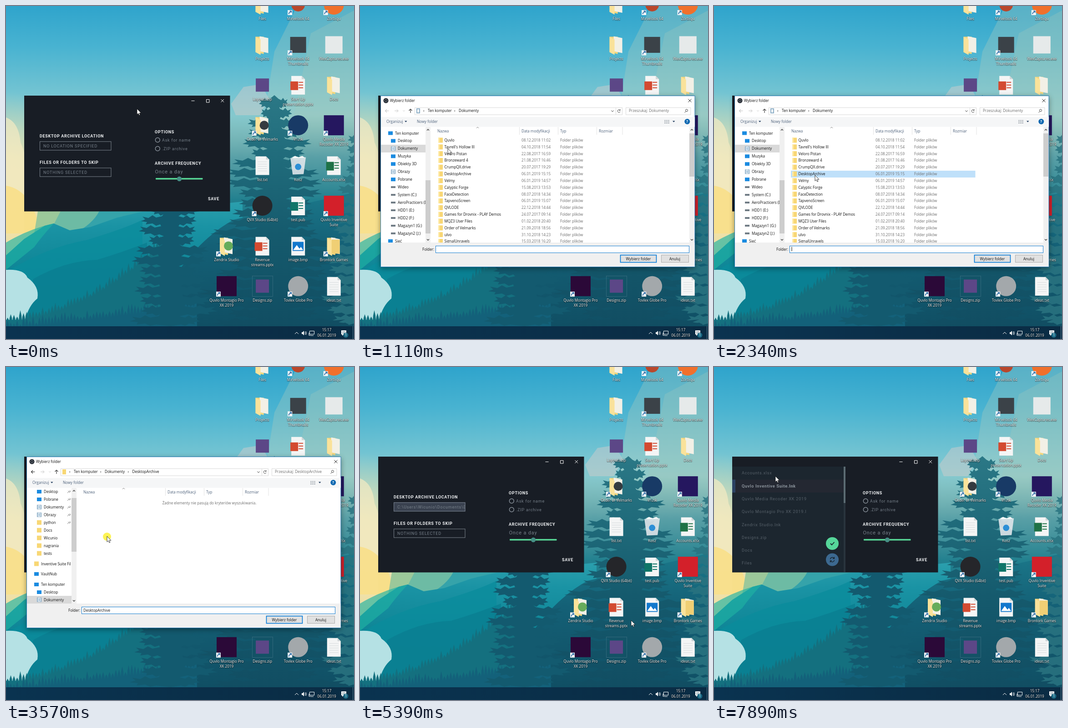
Recreate the animation shown at these times as an HTML page. Size 765 by 732 pixels, loop 7990 ms.

```html
<!DOCTYPE html>
<html lang="pl">
<head>
<meta charset="utf-8">
<title>Desktop archive</title>
<style>
html, body { margin: 0; width: 100%; height: 100%; overflow: hidden; background: #0a3048; }
svg { display: block; width: 100%; height: 100%; }
text { font: 8.1px "Open Sans", "Noto Sans", sans-serif; fill: #111; }
.label { fill: #fff; font-weight: 500; text-anchor: middle; text-shadow: 0 1px 1px #000c, 0 0 2px #0009; }
.mid { text-anchor: middle; }
.soft { fill: #6d6d6d; }
.head { fill: #4c607a; }
.app text { font: 9px Roboto, "Open Sans", sans-serif; letter-spacing: .8px; fill: #77808a; }
.app .title { font-weight: 700; letter-spacing: .68px; fill: #f1f3f5; }
.app .big { font-size: 11px; }
.app .dim { fill: #57616a; }
.app .lit { fill: #8f969e; font-weight: 500; }
#dialog { transform-origin: 390.5px 385px; }
</style>
</head>
<body>
<svg id="stage" viewBox="0 0 765 732" preserveAspectRatio="none"></svg>
<script>
const LOOP = 7990;
let css = '';

// Small drawing helpers
const rect = (x, y, w, h, fill, more = '') => `<rect x="${x}" y="${y}" width="${w}" height="${h}" fill="${fill}" ${more}/>`;
const circle = (x, y, r, fill, more = '') => `<circle cx="${x}" cy="${y}" r="${r}" fill="${fill}" ${more}/>`;
const path = (d, fill, more = '') => `<path d="${d}" fill="${fill}" ${more}/>`;
const line = (d, color, width = 1) => path(d, 'none', `stroke="${color}" stroke-width="${width}"`);
const text = (x, y, s, cls = '', more = '') => `<text x="${x}" y="${y}" class="${cls}" ${more}>${s}</text>`;
const group = (id, body, more = '') => `<g id="${id}" ${more}>${body}</g>`;
const box = (x, y, w, h, fill, color, width = 1) => rect(x, y, w, h, fill, `stroke="${color}" stroke-width="${width}"`);
const stops = list => list.map(([at, color]) => `<stop offset="${at}" stop-color="${color}"/>`).join('');
const gradient = (id, dir, ...list) => `<linearGradient id="${id}" x1="0" y1="0" ${dir}>${stops(list)}</linearGradient>`;
const clip = (id, x, y, w, h) => `<clipPath id="${id}">${rect(x, y, w, h, '#000')}</clipPath>`;

let seed = 11;
const random = () => (seed = seed * 16807 % 2147483647) / 2147483647;

// Keyframes keyed by milliseconds
function animate(id, frames, timing = 'linear') {
  const body = Object.entries(frames).map(([ms, rule]) => `${(ms / LOOP * 100).toFixed(3)}%{${rule}}`).join('');
  css += `@keyframes ${id}{${body}}#${id}{animation:${id} ${LOOP}ms ${timing} infinite}`;
}
// Toggles visibility at each given time
function blink(id, times, first = 0) {
  const frames = { 0: `opacity:${first}` };
  times.forEach((ms, i) => frames[ms] = `opacity:${(i + 1 + first) % 2}`);
  animate(id, frames, 'step-end');
}

// Wallpaper: a fir is a solid core with ragged, uneven branches
function fir(cx, top, bottom, spread, fill, opacity = 1) {
  const step = 22, count = Math.round((bottom - top) / step);
  const side = dir => Array.from({ length: count }, (_, i) => {
    const y = top + i * step, w = spread * Math.sqrt((i + 1) / count) * (.6 + .5 * random());
    return [[.3, 0], [.5, 3], [.62, -2], [.75, 4], [.95, 1], [.86, 7], [1, 11], [.8, 13], [.84, 18], [.62, 16], [.5, 21], [.36, 18]]
      .map(([k, dy]) => [cx + dir * w * k, y + dy]);
  }).flat();
  const points = [[cx, top - 8], ...side(1), [cx, bottom], ...side(-1).reverse()];
  return path('M' + points.map(p => p.map(Math.round).join(' ')).join('L') + 'Z', fill, `opacity="${opacity}"`);
}
function forest(x0, x1, ridge, fill) {
  let d = `M${x0} 704`;
  for (let x = x0; x < x1; x += 7) {
    const y = ridge(x), h = 9 + random() * 16;
    d += `L${x} ${y}L${x + 1} ${y - h * .5}L${x + 3.5} ${y - h}L${x + 6} ${y - h * .5}`;
  }
  return path(d + `L${x1} 704Z`, fill);
}
const wallpaper =
  rect(0, 0, 765, 704, 'url(#sky)') +
  path('M590 100L640 0H765V420H540Z', '#b5cdba', 'opacity=".3"') +
  path('M670 60L765 10V400H600Z', '#9fc5bb', 'opacity=".3"') +
  path('M495 215L522 178L560 172L578 203L558 240H505Z', '#d6cccb', 'opacity=".45"') +
  circle(0, 400, 210, 'url(#glow)') +
  path('M0 245Q28 255 32 300Q46 330 40 350V500H0Z', '#f6ecc4', 'opacity=".7"') +
  path('M0 395Q60 405 75 500H0Z', '#fbdf83', 'opacity=".8"') +
  path('M70 451H330V500H62Z', '#9bc89a') +
  path('M120 451H340V500H95Q105 480 120 451Z', '#6dbba4') +
  path('M205 451H330V500H150Q190 480 205 451Z', '#35a3aa') +
  rect(330, 240, 435, 464, 'url(#mist)') +
  path('M0 548L40 512L85 483L105 478L140 493L185 486L245 465L300 452L420 440L520 430V704H0Z', 'url(#hills)') +
  path('M0 520Q50 490 105 478Q80 505 62 530L0 580Z', '#1fb3a3', 'opacity=".65"') +
  path('M0 585Q90 530 175 515Q260 490 300 470V704H0Z', '#0a8c9d', 'opacity=".8"') +
  path('M60 600Q130 560 200 558Q260 540 310 520V704H30Z', '#0b7f92', 'opacity=".8"') +
  path('M310 704Q390 530 500 470L765 410V704Z', 'url(#ground)') +
  path('M0 580Q40 578 47 597Q74 616 69 643Q50 658 42 690H0Z', '#b5e1e4') +
  forest(0, 340, x => 694 - x * x * .0013 - x * .05, '#14707f') +
  forest(0, 420, x => 712 - x * .12, '#13617a') +
  fir(790, 240, 704, 110, '#2a7481', .85) +
  fir(590, 204, 704, 165, 'url(#bark)') +
  fir(362, 330, 704, 104, '#135a6f');

// Desktop icons
const paper = (x, y) => path(`M${x - 15} ${y - 20}H${x + 8}L${x + 15} ${y - 13}V${y + 21}H${x - 15}Z`, '#f4f5f5') +
  path(`M${x + 8} ${y - 20}V${y - 13}H${x + 15}Z`, '#cfd4d6');
const art = {
  folder: (x, y) => path(`M${x - 15} ${y - 18}H${x + 3}V${y + 20}L${x - 15} ${y + 16}Z`, '#f3d67e') +
    path(`M${x - 6} ${y - 19}L${x + 13} ${y - 15}V${y + 18}L${x - 6} ${y + 14}Z`, '#f2f0e6') +
    path(`M${x - 15} ${y - 18}L${x - 4} ${y - 12}V${y + 22}L${x - 15} ${y + 16}Z`, '#fae29a'),
  full: (x, y, color) => art.folder(x, y) + (color ? circle(x + 4, y, 10, color) : rect(x - 5, y - 14, 18, 31, '#f0cf74')),
  page: (x, y) => paper(x, y) + line([-8, -3, 2, 7, 12].map(dy => `M${x - 10} ${y + dy}h20`).join(''), '#d5dadc'),
  office: (x, y, color) => paper(x, y) + line(`M${x + 1} ${y - 6}h10M${x + 1} ${y}h10M${x + 1} ${y + 6}h10`, color, 2) + rect(x - 17, y - 8, 17, 19, color),
  picture: (x, y) => paper(x, y) + rect(x - 12, y - 9, 24, 20, '#1278cd') + path(`M${x - 11} ${y + 9}l8 -11l6 8l3 -4l5 7Z`, '#fff'),
  square: (x, y, color, size) => rect(x - size / 2, y - size / 2, size, size, color),
  disc: (x, y, color, r) => circle(x, y, r, color),
  bin: (x, y) => path(`M${x - 17} ${y - 16}L${x + 17} ${y - 18}L${x + 12} ${y + 19}L${x - 12} ${y + 20}Z`, '#dfe6ea', 'opacity=".9"') +
    path(`M${x - 15} ${y - 16}l8 -5l8 3l8 -3l6 4Z`, '#f8fafa') + circle(x, y + 3, 7, '#2c8fd6')
};
const desktop = [
  [1, 0, 'folder', 'Files'], [2, 0, 'disc', 'Mirvelook 64', '#b9472c', 15, 1], [3, 0, 'disc', 'Zorbiqu', '#f0702c', 22, 1],
  [1, 1, 'folder', 'Projects'], [2, 1, 'square', 'Mirvelook 64|Thumbnails', '#3b4248', 35, 1], [3, 1, 'square', 'WexCaptures.exe', '#e6eaea', 38],
  [1, 2, 'square', 'Layouts.zip', '#5c4787', 29], [2, 2, 'office', 'Start Up|presentation.pptx', '#d34a30'], [3, 2, 'folder', 'Docs'],
  [1, 3, 'full', 'Order of Velmarks', '#343b40', 0, 1], [2, 3, 'disc', 'Vrusk', '#183a66', 22, 1], [3, 3, 'square', 'Quvlo Media|Recoder XK 2019', '#25175f', 44, 1],
  [1, 4, 'page', 'list.txt'], [2, 4, 'bin', 'Kosz'], [3, 4, 'office', 'Accounts.xlsx', '#1f7246'],
  [1, 5, 'disc', 'QVX Studio (64bit)', '#25262a', 22, 1], [2, 5, 'office', 'test.pub', '#0f7568'], [3, 5, 'square', 'Quvlo Inventive|Suite', '#d3202a', 44, 1],
  [0, 6, 'full', 'Zendrix Studio', '#67ac5b', 0, 1], [1, 6, 'office', 'Revenue|streams.pptx', '#d34a30'], [2, 6, 'picture', 'image.bmp'], [3, 6, 'full', 'Brontork Games', '', 0, 1],
  [0, 7, 'square', 'Quvlo Montagio Pro|XK 2019', '#2b0938', 44, 1], [1, 7, 'square', 'Designs.zip', '#5c4787', 29], [2, 7, 'disc', 'Tovlex Globe Pro', '#a3a8ab', 22, 1], [3, 7, 'page', 'ideas.txt']
].map(([col, row, kind, name, color, size, link]) => {
  const x = 485 + col * 78.6, y = -3 + row * 88.4;
  return art[kind](x, y, color, size) +
    (link ? rect(x - 23, y + 12, 10, 11, '#f3f6f8') + line(`M${x - 20.5} ${y + 21}q0 -5 5 -5m-3 -2h3.5v3.5`, '#1c5f9e', 1.5) : '') +
    name.split('|').map((part, i) => text(x, y + 34 + i * 10.7, part, 'label')).join('');
}).join('') + box(541.5, 593.5, 45, 45, 'none', '#3f7385', .7);

// Taskbar
const taskbar = rect(0, 704, 765, 28, 'url(#bar)') +
  line('M635 721l4 -4l4 4M667.500 714.500h10v7h-10ZM670 724.500h6M666 718v6h4', '#fff') +
  path('M650 717h2l3 -3v10l-3 -3h-2Z', '#fff') + line('M657 716q2 3 0 6M659 715q3 4 0 8', '#fff') +
  text(705, 715, '15:17', 'label') + text(705, 727, '06.01.2019', 'label') +
  path('M737 713h11v9h-6l-3 3v-3h-2Z', '#fff') + line('M739 716h7M739 719h7', '#123a55', .8) +
  circle(747, 723.5, 5.5, '#1c6b86') + text(747, 726.3, '1', 'mid', 'style="fill:#fff"') + line('M762.500 704V732', '#4b7187');

// Settings window
const field = (y, id) => box(74.500, y, 156.500, 19, 'none', '#7d858e') + group(id, rect(74, y - .5, 157.500, 20, '#7f8ca6'));
const files = ['Accounts.xlsx', 'Quvlo Inventive Suite.lnk', 'Quvlo Media Recoder XK 2019', 'Quvlo Montagio Pro XK 2019.lnk', 'Zendrix Studio.lnk', 'Designs.zip', 'Docs', 'Files'];
const rowY = i => 236.3 + i * 28.3;
const panel = rect(40, 219, 249, 232, '#1c262f') + rect(285, 219, 4, 232, '#29343d') + rect(285, 219, 4, 80, '#5b6b72') +
  group('hover-file', rect(40, 247.5, 245, 28.5, '#242832') + rect(40, 247.5, 7, 28.5, '#2b4263')) +
  `<g clip-path="url(#names)">${files.map((f, i) => text(61, rowY(i), f, 'dim')).join('')}</g>` +
  group('lit-file', text(61, rowY(1), files[1], 'lit')) +
  circle(260, 388, 14, '#56d69a') + line('M256 388l3 3l5.500 -6', '#17222a', 1.8) +
  circle(260, 423.5, 14, '#3c6990') + line('M255.500 422.500a4.700 4.700 0 0 1 8.500 -2M264.500 424.500a4.700 4.700 0 0 1 -8.500 2M264.500 417.500v3.500h-3.500M255.500 429.500v-3.500h3.500', '#17222a', 1.3);
const app = `<g class="app">` + rect(40, 197, 452.5, 254.5, '#181d25') +
  line('M407.500 208.500h7M440.500 205.500h6.500v6.500h-6.500ZM472.500 205l6.500 6.500M479 205l-6.500 6.500', '#fff') +
  text(74, 289, 'DESKTOP ARCHIVE LOCATION', 'title') + field(298, 'hover-place') +
  group('no-place', text(82, 311, 'NO LOCATION SPECIFIED')) +
  group('place', text(82, 311, 'C:\\Users\\Wicunio\\Documents\\DesktopArchive', '', 'clip-path="url(#entry)"')) +
  text(74, 347, 'FILES OR FOLDERS TO SKIP', 'title') + field(356, 'hover-skip') + text(82, 369, 'NOTHING SELECTED') +
  text(327, 279.500, 'OPTIONS', 'title') +
  ['Ask for name', '.ZIP archive'].map((s, i) => circle(333.3, 294.5 + i * 19, 5, 'none', 'stroke="#89919a" stroke-width="1.4"') + text(343, 297.5 + i * 19, s)).join('') +
  text(327, 348.500, 'ARCHIVE FREQUENCY', 'title') + text(327.500, 368, 'Once a day', 'big') +
  rect(329, 378, 103.5, 3.5, '#55d192', 'rx="1"') + circle(381, 380, 5.2, '#468f86') +
  text(444, 427, 'SAVE', 'title') + group('panel', panel) + '</g>';

// Folder picker
const colors = { yellow: '#f8d775', blue: '#1a8be0', grey: '#6f7b84', doc: '#8fb0c8' };
function tree(rows) {
  return rows.map(([y, label, color = 'yellow', root = 0, picked = 0]) => {
    const x = root ? 62 : 68, flat = color === 'grey' ? 3 : color === 'blue' ? 1 : 0;
    return (picked ? rect(46, y - 8.5, 98, 17, '#d9d9d9') : '') +
      rect(x, y - 5 + flat, 10, 10 - 2 * flat, colors[color]) +
      (color === 'doc' ? rect(x + 2, y - 4, 6, 8, '#fff') + line(`M${x + 3} ${y - 2}h4M${x + 3} ${y}h4M${x + 3} ${y + 2}h4`, '#3b7cae', .8) : '') +
      text(root ? 77 : 83, y + 3, label);
  }).join('');
}
const spaced = (top, rows) => rows.map((row, i) => [top + i * 16.95, ...row]);
const thisPc = spaced(279.5, [['Ten komputer', 'blue', 1], ['Desktop', 'blue'], ['Dokumenty', 'doc', 0, 1], ['Muzyka', 'blue'], ['Obiekty 3D', 'blue'],
  ['Obrazy', 'doc'], ['Pobrane', 'blue'], ['Wideo', 'grey'], ['System (C:)', 'grey'], ['AeroPracticers (D:)', 'grey'], ['HDD1 (E:)', 'grey'],
  ['HDD2 (F:)', 'grey'], ['Magazyn1 (G:)', 'grey'], ['Magazyn2 (J:)', 'grey'], ['Sieć', 'blue', 1]]);
const quick = [...spaced(274, [['Desktop', 'blue'], ['Pobrane', 'blue'], ['Dokumenty', 'doc'], ['Obrazy', 'doc'], ['python'], ['Docs'], ['Wicunio'], ['nagrania'], ['tests']]),
  [432.5, 'Inventive Suite Fil', 'yellow', 1], [455, 'VaultNub', 'blue', 1], [478, 'Ten komputer', 'blue', 1], [495, 'Desktop', 'blue'], [511.5, 'Dokumenty', 'doc', 0, 1]];
const folders = `Quvlo|08.12.2018 11:02
Tavrell's Hollow III|04.10.2018 11:54
Veloro Pistan|22.08.2017 16:59
Bronzeward 4|21.08.2017 16:46
CrumpQX.drive|20.07.2017 19:29
DesktopArchive|06.01.2019 15:15
Velmy|06.01.2019 14:57
Calyptic Forge|15.08.2013 13:53
FaceDetection|08.07.2018 14:34
TapvenoScreen|06.01.2019 15:07
QVLODE|22.12.2018 14:44
Games for Drovnix - PLAY Demos|24.07.2017 09:14
MQZ3 User Files|01.02.2018 20:40
Order of Velmarks|21.09.2018 18:56
ulvo|31.10.2018 14:23
SignalUnravels|15.03.2018 16:20`.split('\n').map((row, i) => {
  const [name, date] = row.split('|'), y = 298 + i * 14.83;
  return rect(172, y - 8.500, 10, 11, '#f8d775') + rect(172, y - 8.500, 3, 11, '#ffe9a5') + text(185.500, y, name) + text(355, y, date, 'soft') + text(440, y, 'Folder plików', 'soft');
}).join('');
const crumbs = (...parts) => parts.map(([x, s]) => text(x - 10, 233, '›') + text(x, 233, s)).join('');
const arrows = x => line(`M${x - 2.500} 273.500l2.500 -2.500l2.500 2.500M${x - 2.500} 512.500l2.500 2.500l2.500 -2.500`, '#444', 1.3);
const side = (rows, thumb, height) => `<g clip-path="url(#tree)">${tree(rows)}</g>` + rect(144, 266, 11, 254, '#f0f0f0') + rect(144, thumb, 11, height, '#cdcdcd') + arrows(149.5);
const back = color => line('M55.500 230.500h8M59 227l-3.500 3.500l3.500 3.500', color, 1.1);

const listView = side(thisPc, 383, 117) +
  rect(724, 266, 11, 254, '#f0f0f0') + rect(724, 280, 11, 95, '#cdcdcd') + arrows(729.5) +
  group('hover-row', rect(169, 302.500, 405.500, 15, '#d5eafb')) +
  group('picked-row', rect(169, 362, 405.500, 15, '#bfe0fa')) +
  `<g clip-path="url(#rows)">${folders}</g>` + back('#c8c8c8') +
  rect(124, 225, 8, 11, '#8fb0c8') + rect(126, 227, 4, 7, '#fff') + text(591, 233, 'Przeszukaj: Dokumenty', 'soft');
const emptyView = side(quick, 288, 118) +
  line([0, 1, 2, 3, 4].map(i => `M135 ${277 + i * 17}l3 -3m-1.500 -2l4 4m-1 -5l2.500 2.500l-3 1`).join(''), '#777', .9) + back('#333') +
  text(447, 302, 'Żadne elementy nie pasują do kryteriów wyszukiwania.', 'soft mid') +
  rect(124, 225, 8, 11, '#f8d775') + crumbs([277.500, 'DesktopArchive']) + text(591, 233, 'Przeszukaj: DesktopArchive', 'soft');

const content =
  line('M76 230.500h8M80.500 227l3.500 3.500l-3.500 3.500M94.500 229.500l2 2l2 -2', '#c8c8c8') + line('M111 235v-8.500M107.500 230l3.500 -3.500l3.500 3.500', '#444', 1.2) +
  box(120.5, 223.5, 456, 15.5, 'none', '#d9d9d9') + box(584.5, 223.5, 142.5, 15.5, 'none', '#d9d9d9') +
  line('M562.500 224v15', '#d9d9d9') + line('M552.500 229.500l2.500 3l2.500 -3M571.500 229a3 3 0 1 0 .5 3M572 227v2.500h-2.500M713.500 234.500l3 -3', '#444') +
  circle(718, 229.500, 2.500, 'none', 'stroke="#444"') + crumbs([149, 'Ten komputer'], [217, 'Dokumenty']) +
  rect(46, 244, 690, 21.500, '#f5f6f7') + text(58, 257, 'Organizuj', 'head') + path('M98 252.500h5.500l-2.700 3Z', '#1e395b') +
  text(125, 257, 'Nowy folder', 'head') + line('M669 251.500h3m1 0h3m1 0h3M669 254.500h3m1 0h3m1 0h3M669 257.500h3m1 0h3m1 0h3', '#7b858f') +
  path('M687 252.500h5.500l-2.700 3Z', '#1e395b') + circle(719.3, 254, 6, '#0d68b1') + text(719.3, 257, '?', 'mid', 'style="fill:#fff;font-weight:700"') +
  line('M350.500 266v17M435.500 266v17M520.500 266v17M577 266v17', '#e3e3e3') + line('M256 268.500l2.500 -2.500l2.500 2.500', '#777') +
  [[170, 'Nazwa'], [355, 'Data modyfikacji'], [440, 'Typ'], [525, 'Rozmiar']].map(([x, s]) => text(x, 277.500, s, 'head')).join('') +
  group('list-view', listView) + group('empty-view', emptyView) +
  text(137, 538, 'Folder:') + group('caret', line('M171 529.500v9.500', '#000')) + group('chosen', text(170, 537.500, 'DesktopArchive')) +
  box(572.5, 547.5, 79, 16, '#e1e1e1', '#0078d7', 1.6) + box(662.5, 547.5, 60, 16, '#e1e1e1', '#adadad') +
  text(612, 558.500, 'Wybierz folder', 'mid') + text(692, 558.500, 'Anuluj', 'mid');
const dialog = rect(45.5, 197.5, 690.5, 376, '#fff', 'stroke="#2c7dbb" style="filter:drop-shadow(0 3px 6px #0006)"') +
  rect(46, 520, 689.5, 53, '#f0f0f0') +
  circle(57, 208, 5.500, '#20252d') + circle(57, 208, 2.800, 'none', 'stroke="#9aa4ad" stroke-width=".8"') +
  text(66, 211, 'Wybierz folder') + line('M721.500 204.500l7 7M728.500 204.500l-7 7', '#222') + arrows(149.5) +
  box(166.5, 527.5, 557, 15, '#fff', '#1a7fd0') + group('content', content);

const pointer = group('cursor', group('click', circle(0, 1, 9, '#fdf02c', 'opacity=".8"')) +
  path('M0 0V12.500L2.900 9.900L4.900 14.300L6.900 13.400L5 9.200H8.900Z', '#fff', 'stroke="#111" stroke-width=".8"'));

const defs = '<defs>' +
  gradient('sky', 'x2="0" y2="1"', [0, '#2fa4cc'], [.13, '#49b3d1'], [.28, '#76c5d2'], [.42, '#98cdc8'], [.55, '#b9d3bd'], [.7, '#e6d9a0']) +
  `<radialGradient id="glow">${stops([[.3, '#f5e6aecc'], [1, '#f5e6ae00']])}</radialGradient>` +
  gradient('mist', 'x2="0" y2="1"', [0, '#4d9aa200'], [.2, '#4594a0cc'], [.4, '#22808f'], [1, '#11566b']) +
  gradient('hills', 'x2="0" y2="1"', [0, '#2b9fad'], [.2, '#1a93a4'], [.6, '#0d8394'], [1, '#0f677c']) +
  gradient('ground', 'x2="0" y2="1"', [0, '#1b788a'], [.4, '#146076'], [1, '#104f64']) +
  gradient('bark', 'x2="0" y2="1"', [0, '#2b7886'], [.3, '#1f6a7a'], [.6, '#155a6d'], [1, '#114d62']) +
  gradient('bar', 'x2="1" y2="0"', [0, '#0a3350'], [1, '#0a2c44']) +
  clip('names', 40, 219, 163, 232) + clip('entry', 75, 299, 156, 18) + clip('tree', 46, 266, 98, 254) + clip('rows', 156, 284, 568, 236) + '</defs>';

document.getElementById('stage').innerHTML = defs + wallpaper + desktop + taskbar + app + group('dialog', dialog) + pointer;

// Motion
const route = {};
[[0, 288, 226], [20, 288, 226], [220, 370, 262], [330, 391, 290], [520, 270, 345], [630, 205, 356], [760, 193, 313], [1640, 193, 313],
  [1850, 205, 240], [1950, 208, 238], [2340, 222, 372], [3700, 222, 372], [3990, 232, 388], [4150, 290, 415], [4400, 480, 510], [4650, 596, 557],
  [5500, 596, 557], [5690, 409, 477], [5900, 345, 300], [6020, 300, 275], [6200, 225, 310], [6390, 197, 371], [6650, 197, 371],
  [6950, 320, 345], [7190, 420, 322], [7300, 449, 318], [7500, 340, 310], [7750, 160, 268], [7880, 135, 240], [7990, 135, 240]
].forEach(([ms, x, y]) => route[ms] = `transform:translate(${x}px,${y}px)`);
animate('cursor', route);
blink('click', [740, 890, 3250, 3370, 3450, 3720, 4850, 5000, 6470, 6620]);

const pose = (opacity, scale) => `opacity:${opacity};transform:scale(${scale})`;
animate('dialog', {
  0: pose(0, .95), 880: pose(0, .95), 908: pose(.31, .964), 985: pose(.31, .964), 1110: pose(1, 1),
  5060: pose(1, 1), 5188: pose(.38, .977), 5265: pose(.38, .977), 5370: pose(0, .95), 7990: pose(0, .95)
});
blink('content', [1010, 5400]);
blink('list-view', [3460], 1);
blink('empty-view', [3460]);
blink('hover-row', [1200, 1690]);
blink('picked-row', [2300, 3460]);
blink('caret', [1200, 1740, 2270, 2800]);
blink('chosen', [3270]);
blink('no-place', [5080], 1);
blink('place', [5080]);

const fade = (id, ...spans) => {
  const frames = { 0: 'opacity:0', 7990: 'opacity:0' };
  spans.forEach(([start, on, end, off]) => Object.assign(frames, { [start]: 'opacity:0', [on]: 'opacity:1', [end]: 'opacity:1', [off]: 'opacity:0' }));
  animate(id, frames);
};
fade('hover-place', [690, 800, 5270, 5450]);
fade('hover-skip', [540, 620, 650, 760], [6400, 6520, 6700, 6900]);
const reveal = (id, start, on) => animate(id, { 0: 'opacity:0', [start]: 'opacity:0', [on]: 'opacity:1', 7990: 'opacity:1' });
reveal('panel', 6560, 6860);
reveal('hover-file', 7700, 7840);
reveal('lit-file', 7700, 7840);

document.head.appendChild(document.createElement('style')).textContent = css;
</script>
</body>
</html>
```
